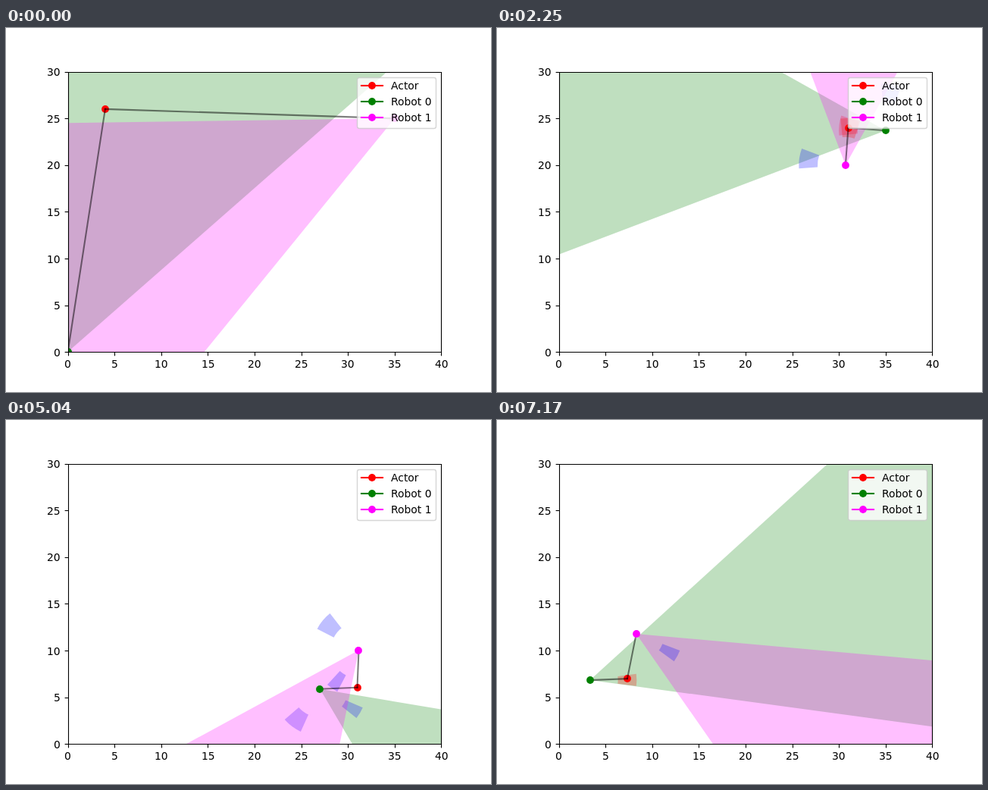
Write an HTML page that moves like this. It is 640 px wide and 480 px high and loops after 7200 ms.

```html
<!DOCTYPE html>
<html lang="en">
<head>
<meta charset="utf-8">
<title>Actor and robots</title>
<style>
  html, body { margin: 0; width: 100%; height: 100%; overflow: hidden; background: #fff; }
  svg { display: block; }
  text { font: 13.89px "DejaVu Sans", sans-serif; fill: #000; }
</style>
</head>
<body>
<svg id="stage" width="640" height="480" viewBox="0 0 640 480">
  <clipPath id="plot"><rect x="82" y="58" width="492" height="369"/></clipPath>
  <g id="scene" clip-path="url(#plot)"></g>
  <g id="axes"></g>
  <g id="legend"></g>
</svg>
<script>
const LOOP = 7200, STEP = 30, SCALE = 12.32;
const RED = '#f00', GREEN = '#008000', PINK = '#f0f', BLUE = '#00f';
const HALF_VIEW = 25, GAP = 4, TURN = 3;
const SEARCH = 150, RETURN = 190;   // steps at which the cameras change task

const X = x => 81.6 + x * SCALE;
const Y = y => 427.2 - y * SCALE;
const rad = deg => deg * Math.PI / 180;
const clamp = v => Math.min(1, Math.max(0, v));
const mix = (a, b, p) => a.map((v, i) => v + (b[i] - v) * p);
const bend = (a, b, c, p) => mix(mix(a, b, p), mix(b, c, p), p);

// The actor walks straight legs between waypoints.
const POINTS = [[4, 26], [31, 24], [32, 6], [7, 7]];
const TIMES = [0, 75, 165, 240];
const legAt = t => t < TIMES[1] ? 0 : t < TIMES[2] ? 1 : 2;

function actorAt(t) {
  const i = legAt(t);
  return mix(POINTS[i], POINTS[i + 1], (t - TIMES[i]) / (TIMES[i + 1] - TIMES[i]));
}

function heading(leg) {
  const dx = POINTS[leg + 1][0] - POINTS[leg][0];
  const dy = POINTS[leg + 1][1] - POINTS[leg][1];
  const length = Math.hypot(dx, dy);
  return [dx / length, dy / length];
}

// Bearings of tracked objects, in degrees by step.
const ahead = t => -31 - .8 * (t - 168);
const below = t => 235.2 + .8 * (t - 168);
const trailing = t => -3.5 - .89 * (t - 211);

// start and control shape the approach, as offsets from the actor.
const ROBOTS = [
  {
    color: GREEN, start: [-4, -26], control: [0, -13.15], arrive: 30,
    place: ([hx, hy]) => [GAP * hx, -GAP * Math.abs(hy)],
    camera(t, actor) {
      if (t < SEARCH) return actor - 15 * (1 - clamp(t / this.arrive));
      return t < RETURN ? ahead(t) - 3.5 : actor + 15;
    }
  },
  {
    color: PINK, start: [31, -1], control: [-4.5, -19.3], arrive: 65,
    place: ([hx, hy]) => [GAP * hy, -GAP * hx],
    camera(t, actor) {
      if (t < SEARCH) return actor + 27.65 + 332.35 * clamp(t / 62) ** 2.36;
      return (t < RETURN ? below(t) : trailing(t)) - 1.7;
    }
  }
];

function offsetAt(robot, t) {
  const leg = legAt(t), goal = robot.place(heading(leg));
  if (leg === 0) return bend(robot.start, robot.control, goal, clamp(t / robot.arrive));
  const offset = mix(robot.place(heading(leg - 1)), goal, clamp((t - TIMES[leg]) / TURN));
  const drift = robot.color === PINK ? .8 * clamp((t - 211) / 28) : 0;
  return offset.map(v => v + drift);
}

// Estimates of where things are, seen from one robot.
const estimate = (robot, color, from, to, half, bearing) => ({ robot, color, from, to, half, bearing });
const toActor = (t, actor) => actor - 2;
const WIDE = 12.4, TIGHT = 7.5;
const ESTIMATES = [
  estimate(0, RED, 24, SEARCH, WIDE, toActor),
  estimate(1, RED, 62, SEARCH, WIDE, toActor),
  estimate(0, RED, RETURN, 240, TIGHT, toActor),
  estimate(0, BLUE, 60, SEARCH, WIDE, t => 83 - 2.05 * (t - 75)),
  estimate(0, BLUE, SEARCH, RETURN, TIGHT, ahead),
  estimate(0, BLUE, SEARCH, RETURN, WIDE, t => 233.3 + .4 * (t - 168)),
  estimate(1, BLUE, 20, 60, WIDE, t => .7 * (t - 47) - 69.6),
  estimate(1, BLUE, 60, RETURN, WIDE, t => 86.5 + .0318 * (t - 126.8) ** 2),
  estimate(1, BLUE, SEARCH, RETURN, TIGHT, below),
  estimate(1, BLUE, RETURN, 240, TIGHT, trailing)
];

function set(el, attrs) {
  for (const name in attrs) el.setAttribute(name, attrs[name]);
}

function add(parent, tag, attrs, label) {
  const el = document.createElementNS('http://www.w3.org/2000/svg', tag);
  set(el, attrs);
  if (label !== undefined) el.textContent = label;
  document.getElementById(parent).appendChild(el);
  return el;
}

function sector([x, y], bearing, half, inner, outer) {
  const at = (r, a) => `${X(x + r * Math.cos(rad(a))).toFixed(2)} ${Y(y + r * Math.sin(rad(a))).toFixed(2)}`;
  const lo = bearing - half, hi = bearing + half;
  const ro = outer * SCALE, ri = inner * SCALE;
  return `M${at(inner, lo)}L${at(outer, lo)}A${ro} ${ro} 0 0 0 ${at(outer, hi)}` +
         `L${at(inner, hi)}` + (inner ? `A${ri} ${ri} 0 0 1 ${at(inner, lo)}Z` : 'Z');
}

function drawAxes() {
  const line = d => add('axes', 'path', { d, stroke: '#000', 'stroke-width': 1.11, fill: 'none' });
  const snap = v => Math.round(v) + .5;
  const width = v => String(v).length * 8.84;
  for (let v = 0; v <= 40; v += 5) {
    line(`M${snap(X(v))} 427.5v4.9`);
    add('axes', 'text', { x: Math.round(X(v) - width(v) / 2), y: 448 }, v);
    if (v > 30) continue;
    line(`M82.5 ${snap(Y(v))}h-4.9`);
    add('axes', 'text', { x: Math.round(71.9 - width(v)), y: Math.round(Y(v) + 5.6) }, v);
  }
  line('M82.5 58.5H574.5V427.5H82.5Z');
}

function drawLegend() {
  add('legend', 'rect', { x: 463.5, y: 65.5, width: 104, height: 67, rx: 2.8,
    fill: '#fff', stroke: '#ccc', 'stroke-width': 1.39, opacity: .8 });
  [['Actor', RED], ['Robot 0', GREEN], ['Robot 1', PINK]].forEach(([name, color], i) => {
    const y = 76 + 21 * i;
    add('legend', 'path', { d: `M469 ${y}h28`, stroke: color, 'stroke-width': 2.08, 'stroke-linecap': 'square' });
    add('legend', 'circle', { cx: 483, cy: y, r: 4.9, fill: color });
    add('legend', 'text', { x: 508, y: y + 5 }, name);
  });
}

const area = fill => add('scene', 'path', { fill, 'fill-opacity': .25 });
const dot = fill => add('scene', 'circle', { r: 4.9, fill });
const moveDot = (el, [x, y]) => set(el, { cx: Math.round(X(x)), cy: Math.round(Y(y)) });

// Each robot's estimates lie directly over its own view.
ROBOTS.forEach((robot, i) => {
  robot.view = area(robot.color);
  for (const e of ESTIMATES) if (e.robot === i) e.mark = area(e.color);
});
const actorDot = dot(RED);
for (const robot of ROBOTS) {
  robot.link = add('scene', 'line', { stroke: '#000', 'stroke-width': 2.08,
    'stroke-opacity': .5, 'stroke-linecap': 'square' });
  robot.dot = dot(robot.color);
}

function draw(t) {
  const actor = actorAt(t), [ax, ay] = actor;
  moveDot(actorDot, actor);

  const poses = ROBOTS.map(robot => {
    const [dx, dy] = offsetAt(robot, t);
    const pos = [ax + dx, ay + dy];
    const bearing = Math.atan2(-dy, -dx) * 180 / Math.PI;
    set(robot.view, { d: sector(pos, robot.camera(t, bearing), HALF_VIEW, 0, 100) });
    set(robot.link, { x1: X(ax), y1: Y(ay), x2: X(pos[0]), y2: Y(pos[1]) });
    moveDot(robot.dot, pos);
    return { pos, bearing };
  });

  for (const e of ESTIMATES) {
    const { pos, bearing } = poses[e.robot];
    const seen = t >= e.from && t < e.to;
    set(e.mark, { d: seen ? sector(pos, e.bearing(t, bearing), e.half, GAP - 1, GAP + 1) : '' });
  }
}

drawAxes();
drawLegend();
const start = performance.now();
function tick() {
  draw(Math.floor((performance.now() - start) % LOOP / STEP));
  requestAnimationFrame(tick);
}
tick();
</script>
</body>
</html>
```
